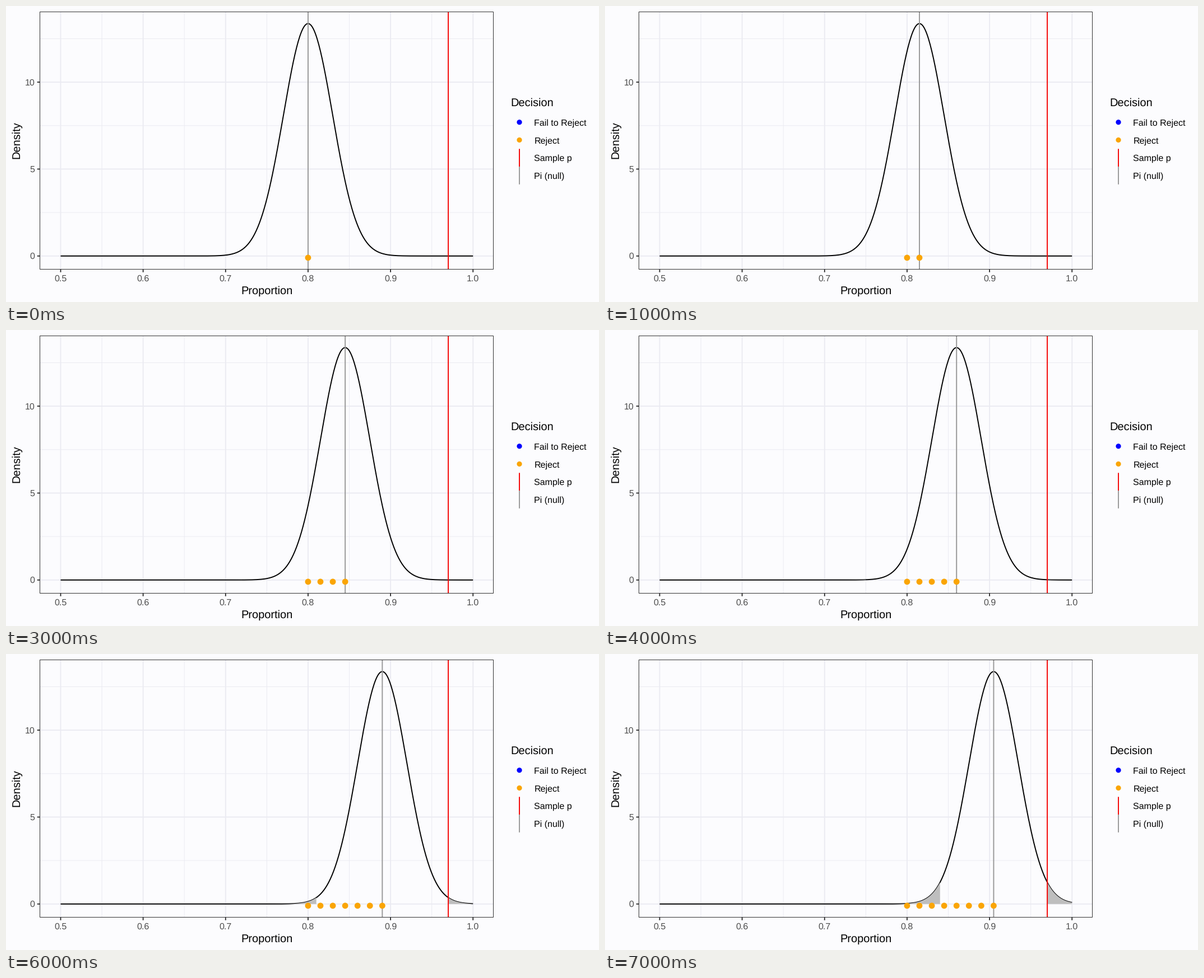
A matplotlib script that plays this animation: 1058 px wide and 529 px high, repeating every 8000 ms.

```python
import matplotlib.pyplot as plt
import numpy as np
from matplotlib.animation import FuncAnimation
from matplotlib.patches import Circle, Rectangle

WIDTH, HEIGHT, DPI = 1058, 529, 100
LEFT, RIGHT, TOP, BOTTOM = 60.7, 870.0, 10.5, 470.8
SIGMA = 0.02984
SAMPLE_P = 0.97
START, STEP = 0.8, 0.015
FRAMES = 8
DOT_Y = -0.1
BACKGROUND, GRID = "#fcfcfe", "#ebebf2"
BORDER, TICK_TEXT = "#333333", "#4d4d4d"
NULL_GREY, SHADE = "#999999", "#bebebe"
ACCEPT, REJECT, RED = "#0000ff", "#faa505", "#f50505"
LINE = 1.94

plt.rcParams["font.family"] = "Liberation Sans"
plt.rcParams["text.hinting"] = "none"
plt.rcParams["path.snap"] = False

fig = plt.figure(figsize=(WIDTH / DPI, HEIGHT / DPI), dpi=DPI, facecolor=BACKGROUND)
ax = fig.add_axes([0, 0, 1, 1])
ax.set_xlim(0, WIDTH)
ax.set_ylim(HEIGHT, 0)
ax.axis("off")


def density(x, mean):
    return np.exp(-((x - mean) / SIGMA) ** 2 / 2) / (SIGMA * np.sqrt(2 * np.pi))


PEAK = density(0, 0)
Y_PAD = 0.05 * (PEAK - DOT_Y)
Y_MIN, Y_MAX = DOT_Y - Y_PAD, PEAK + Y_PAD


def px(x):
    return LEFT + (x - 0.475) / 0.55 * (RIGHT - LEFT)


def py(y):
    return BOTTOM - (y - Y_MIN) / (Y_MAX - Y_MIN) * (BOTTOM - TOP)


def line(xs, ys, color, width=LINE, z=1):
    return ax.plot(xs, ys, color=color, lw=width * 72 / DPI, zorder=z,
                   solid_capstyle="butt", solid_joinstyle="round")[0]


def label(x, y, text, size, color="black", **kw):
    ax.text(x, y, text, fontsize=size * 72 / DPI, color=color, va="baseline", **kw)


def dot(x, y, radius, color):
    return ax.add_patch(Circle((x, y), radius, color=color, lw=0, zorder=6))


def draw_panel():
    for x in np.arange(0.55, 1, 0.1):
        line([px(x)] * 2, [TOP, BOTTOM], GRID, LINE / 2)
    for y in (2.5, 7.5, 12.5):
        line([LEFT, RIGHT], [py(y)] * 2, GRID, LINE / 2)
    for x in np.arange(5, 11) / 10:
        line([px(x)] * 2, [TOP, BOTTOM], GRID)
        line([px(x)] * 2, [BOTTOM, BOTTOM + 5], BORDER)
        label(px(x), 491.6, f"{x:.1f}", 16, TICK_TEXT, ha="center")
    for y in (0, 5, 10):
        line([LEFT, RIGHT], [py(y)] * 2, GRID)
        line([LEFT - 5, LEFT], [py(y)] * 2, BORDER)
        label(51.3, py(y) + 5.5, str(y), 16, TICK_TEXT, ha="right")
    # One-pixel border centred on whole pixels.
    left, top = int(LEFT) + 0.5, int(TOP) + 0.5
    ax.add_patch(Rectangle((left, top), 809, 460, fill=False, ec=BORDER,
                           lw=72 / DPI, zorder=8))
    label((LEFT + RIGHT) / 2, 514.4, "Proportion", 20, ha="center")
    label(24.4, (TOP + BOTTOM) / 2 - 1, "Density", 20, ha="center",
          rotation=90, rotation_mode="anchor")


def draw_legend():
    key_x, key_y, row = 916, 207.7, 31.75
    label(900.4, 179, "Decision", 20)
    for i, text in enumerate(("Fail to Reject", "Reject", "Sample p", "Pi (null)")):
        label(942.2, key_y + 5.8 + i * row, text, 16)
    dot(key_x, key_y, 4.6, ACCEPT)
    dot(key_x, key_y + row, 4.6, REJECT)
    for i, color in ((2, RED), (3, NULL_GREY)):
        middle = key_y + i * row
        line([key_x] * 2, [middle - row / 2, middle + row / 2], color)


draw_panel()
draw_legend()
grid_x = np.linspace(0.5, 1, 501)
curve = line([], [], "black", z=2)
tails = [ax.fill([0], [0], color=SHADE, lw=0, zorder=3)[0] for _ in range(2)]
null_line = line([], [], NULL_GREY, z=4)
line([px(SAMPLE_P)] * 2, [TOP, BOTTOM], RED, z=5)
dots = [dot(px(START + i * STEP), py(DOT_Y), 5.4, REJECT) for i in range(FRAMES)]


def shade(patch, low, high, mean):
    xs = np.linspace(low, high, 300)
    ys = density(xs, mean)
    patch.set_xy(np.column_stack([
        px(np.r_[low, xs, high]), py(np.r_[0, ys, 0])]))


def update(frame):
    mean = START + frame * STEP
    curve.set_data(px(grid_x), py(density(grid_x, mean)))
    shade(tails[0], 0.5, 2 * mean - SAMPLE_P, mean)
    shade(tails[1], SAMPLE_P, 1, mean)
    null_line.set_data([px(mean)] * 2, [TOP, BOTTOM])
    for i, d in enumerate(dots):
        d.set_visible(i <= frame)
    return [curve, null_line, *tails, *dots]


anim = FuncAnimation(fig, update, frames=FRAMES, interval=1000,
                     init_func=lambda: update(0), repeat=True, repeat_delay=0)
plt.show()
```
